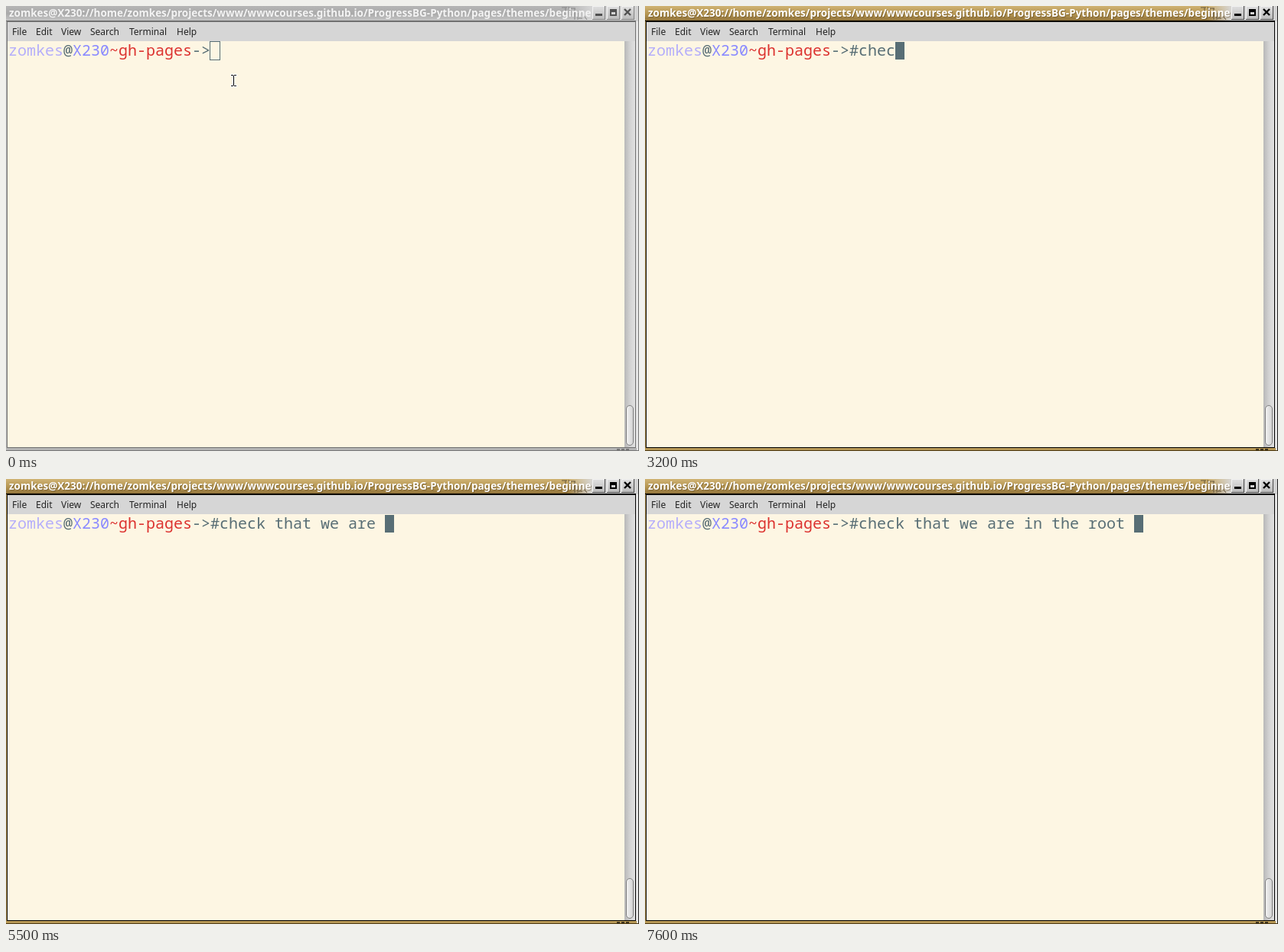
Animation, 827 px wide and 582 px high, one loop 8000 ms. Source, as an HTML page with a canvas:

```html
<!DOCTYPE html>
<html lang="en">
<head>
<meta charset="utf-8">
<title>Terminal</title>
<style>
  html, body { margin: 0; width: 100%; height: 100%; overflow: hidden; }
  canvas { display: block; }
</style>
</head>
<body>
<canvas id="stage" width="827" height="582"></canvas>
<script>
const ctx = document.getElementById('stage').getContext('2d');

const LOOP = 8000, FOCUS_AT = 500, POINTER_HIDDEN_AT = 1500;
const CURSOR_OFF = [2000, 2300];
const CELL = 12, LINE_X = 3, BASELINE = 65;
const INK = '#586e75';
const MONO = '20px "Noto Sans Mono", monospace';
const MENU_FONT = '12px "Noto Sans", sans-serif';
const TITLE_FONT = 'bold 13.5px "Noto Sans", sans-serif';

const TITLE = 'zomkes@X230://home/zomkes/projects/www/wwwcourses.github.io/ProgressBG-Python/pages/themes/beginne';
const MENU = [['File', 8], ['Edit', 39], ['View', 72], ['Search', 110], ['Terminal', 161], ['Help', 223]];
const PROMPT = [['zomkes', '#b5aefa'], ['@', INK], ['X230', '#8a8aff'], ['~gh-pages', '#dc322f'], ['->', INK]];

// Each key is typed at its time; '<' is a backspace.
const KEYS = '#chec' + 'l<' + 'k that we are in the root ';
const KEY_TIMES = [
  1400, 2300, 2400, 2400, 2600, 2800, 3200, 3500, 3700,
  4000, 4100, 4300, 4400, 4500, 4700, 4800, 5000,
  5200, 5300, 5400, 5500, 5700, 5800, 6000, 6100, 6200, 6300, 6500,
  7000, 7100, 7300, 7400, 7600
];
const POINTER_STEPS = [[0, 297], [100, 298], [400, 299], [600, 300]];

function rect(x, y, w, h, color) {
  ctx.fillStyle = color;
  ctx.fillRect(x, y, w, h);
}

function gradient(x0, y0, x1, y1, ...colors) {
  const g = ctx.createLinearGradient(x0, y0, x1, y1);
  colors.forEach((c, i) => g.addColorStop(i / (colors.length - 1), c));
  return g;
}

function text(str, x, y, font, color) {
  ctx.font = font;
  ctx.fillStyle = color;
  ctx.fillText(str, x, y);
}

function strokes(color, ...lines) {
  ctx.strokeStyle = color;
  ctx.lineWidth = 1;
  ctx.beginPath();
  for (const [x0, y0, x1, y1] of lines) {
    ctx.moveTo(x0, y0);
    ctx.lineTo(x1, y1);
  }
  ctx.stroke();
}

function button(x, focused) {
  rect(x, 0, 17, 18, focused ? '#4c4c4c' : '#858585');
  rect(x, 0, 16, 17, '#f2f2f2');
  rect(x + 1, 1, 15, 16, gradient(0, 1, 0, 17, '#dedede', '#bcbcbc'));
}

function drawTitleBar(focused) {
  const bar = focused ? ['#d0b373', '#b59653', '#90723a'] : ['#b5b5b5', '#aaaaaa', '#c8c8c8'];
  const edge = focused ? '#000' : '#707070';
  const icon = focused ? '#000' : '#505050';
  rect(0, 0, 827, 20, gradient(0, 0, 0, 20, ...bar));
  rect(735, 0, 32, 19, gradient(735, 0, 767, 0, 'rgba(215,215,215,0)', '#d7d7d7'));
  rect(766, 0, 61, 20, '#d2d2d2');
  strokes(focused ? '#665638' : '#858585',
    [726, 2, 733, 2], [731, 2, 731, 8], [735, 1, 738, 12], [738, 3, 744, 3],
    [743, 3, 743, 18], [747, 9, 747, 18], [748, 16, 753, 16], [754, 11, 759, 18]);

  ctx.save();
  ctx.beginPath();
  ctx.rect(0, 0, 765, 20);
  ctx.clip();
  if (focused) text(TITLE, 5, 15, TITLE_FONT, 'rgba(70,50,15,.45)');
  text(TITLE, 4, 14, TITLE_FONT, focused ? '#fff' : '#f3f3f3');
  ctx.restore();

  for (const x of [766, 785, 804]) button(x, focused);
  rect(770, 10, 9, 3, icon);
  rect(789, 4, 9, 9, icon);
  rect(791, 8, 5, 3, '#d5d5d5');
  ctx.strokeStyle = icon;
  ctx.lineWidth = 2.4;
  ctx.beginPath();
  ctx.moveTo(808, 4); ctx.lineTo(816, 12);
  ctx.moveTo(816, 4); ctx.lineTo(808, 12);
  ctx.stroke();
  rect(0, 19, 823, 2, edge);
}

function drawFrame(focused) {
  const edge = focused ? '#000' : '#707070';
  const side = focused ? '#b69754' : '#b4b4b4';
  rect(0, 20, 1, 562, side);
  rect(1, 20, 1, 558, edge);
  rect(822, 20, 1, 558, edge);
  rect(823, 20, 3, 562, '#e6e6e6');
  rect(826, 0, 1, 582, focused ? '#222' : '#777');
  rect(1, 577, 822, 1, edge);
  rect(0, 578, 824, 3, side);
  rect(0, 581, 827, 1, focused ? '#4d3b16' : '#777');
  for (const x of [798, 804, 810]) rect(x, 579, 4, 2, focused ? '#3d321c' : '#777');
}

function drawContent() {
  rect(2, 21, 820, 25, '#d6d6d6');
  for (const [label, x] of MENU) text(label, x, 38, MENU_FONT, '#242424');
  rect(2, 46, 806, 531, '#fdf6e3');
  rect(808, 46, 14, 531, gradient(808, 0, 822, 0, '#b8b8b8', '#d2d2d2', '#e2e2e2'));
  ctx.beginPath();
  ctx.roundRect(810.5, 522.5, 9, 52, 4.5);
  ctx.fillStyle = gradient(810, 0, 820, 0, '#f5f5f5', '#cfcfcf');
  ctx.fill();
  ctx.strokeStyle = '#808080';
  ctx.lineWidth = 1;
  ctx.stroke();
}

function typedAt(time) {
  let line = '';
  KEY_TIMES.forEach((at, i) => {
    if (at <= time) line = KEYS[i] === '<' ? line.slice(0, -1) : line + KEYS[i];
  });
  return line;
}

function drawLine(time, focused) {
  let x = LINE_X;
  for (const [str, color] of [...PROMPT, [typedAt(time), INK]]) {
    text(str, x, BASELINE, MONO, color);
    x += str.length * CELL;
  }
  if (!focused) {
    ctx.strokeStyle = INK;
    ctx.lineWidth = 1;
    ctx.strokeRect(x - 0.5, 46.5, CELL + 1, 24);
  } else if (time < CURSOR_OFF[0] || time >= CURSOR_OFF[1]) {
    rect(x, 47, CELL, 23, INK);
  }
}

function drawPointer(time) {
  if (time >= POINTER_HIDDEN_AT) return;
  const x = POINTER_STEPS.filter(([at]) => at <= time).pop()[1];
  const parts = [[x - 3, 90, 3, 1], [x + 1, 90, 3, 1], [x, 91, 1, 13], [x - 3, 104, 3, 1], [x + 1, 104, 3, 1]];
  for (const [px, py, w, h] of parts) rect(px - 1, py - 1, w + 2, h + 2, '#fff');
  for (const part of parts) rect(...part, '#000');
}

function draw() {
  const time = performance.now() % LOOP;
  const focused = time >= FOCUS_AT;
  drawTitleBar(focused);
  drawFrame(focused);
  drawContent();
  drawLine(time, focused);
  drawPointer(time);
  requestAnimationFrame(draw);
}
draw();
</script>
</body>
</html>
```
